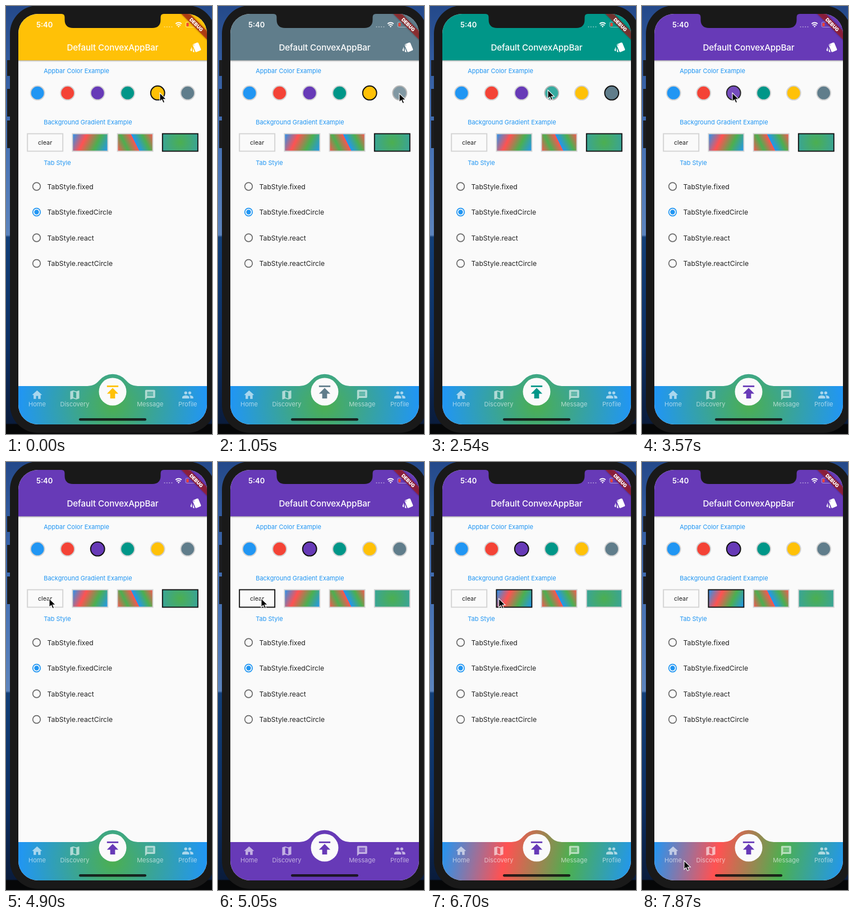
Recreate the animation shown at these times as an HTML page. Size 367 by 759 pixels, loop 8000 ms.

```html
<!DOCTYPE html>
<html lang="en">
<head>
<meta charset="utf-8">
<title>App bar demo</title>
<style>
html, body { margin: 0; width: 100%; height: 100%; overflow: hidden; background: #0a1c3c; }
svg { display: block; width: 367px; height: 759px; font-family: Inter, Roboto, sans-serif; }
.head { font-size: 11px; fill: #2196f3; }
.item { font-size: 12.2px; fill: #222; }
.tab { font-size: 11px; text-anchor: middle; fill: #fff; fill-opacity: .6; }
.radio { fill: none; stroke: #6b6b6b; stroke-width: 1.7; }
</style>
</head>
<body>
<svg viewBox="0 0 367 759">
  <defs>
    <linearGradient id="wall" x2="0" y2="1">
      <stop offset="0" stop-color="#24498a"/><stop offset=".25" stop-color="#3f6bb0"/>
      <stop offset=".535" stop-color="#5c84bd"/><stop offset=".54" stop-color="#123f78"/>
      <stop offset=".8" stop-color="#0c2f63"/><stop offset=".975" stop-color="#0a1c3c"/>
      <stop offset=".978" stop-color="#060708"/>
    </linearGradient>
    <clipPath id="screen"><rect x="22" y="14" width="336" height="728" rx="35"/></clipPath>
    <filter id="soft" x="-20%" y="-50%" width="140%" height="200%"><feGaussianBlur stdDeviation="1.5"/></filter>
  </defs>

  <rect width="367" height="759" fill="url(#wall)"/>
  <path d="M2 96h6v28h-6zM2 147h6v49h-6zM2 203h6v49h-6z" fill="#1c1d20"/>
  <rect x="7" y="-1" width="366" height="758" rx="50" fill="#191919"/>

  <g clip-path="url(#screen)">
    <rect x="22" y="14" width="336" height="728" fill="#fafafa"/>
    <rect x="18" y="80" width="344" height="17" fill="#000" opacity=".45" filter="url(#soft)"/>
    <rect id="appbar" x="22" y="14" width="336" height="82.3"/>
    <g fill="#fff">
      <text x="54" y="37.7" font-size="13" font-weight="600">5:40</text>
      <text x="190" y="78.6" font-size="15.2" font-weight="500" letter-spacing="-.1" text-anchor="middle">Default ConvexAppBar</text>
      <g opacity=".45">
        <circle cx="282.5" cy="37" r="1.1"/><circle cx="286.8" cy="37" r="1.1"/>
        <circle cx="291.1" cy="37" r="1.1"/><circle cx="295.4" cy="37" r="1.1"/>
      </g>
      <path d="M302.2 31.6a7.6 7.6 0 0 1 10.6 0M304 34.4a5 5 0 0 1 7 0" fill="none" stroke="#fff" stroke-width="1.9"/>
      <path d="M305.7 36l1.8 2 1.8-2q-1.8-1.6-3.6 0z"/>
      <rect x="320" y="28.5" width="18" height="9" rx="2.4" fill="none" stroke="#fff" stroke-opacity=".45"/>
      <rect x="321.5" y="30" width="4" height="6" rx="1" fill="#f44336"/>
    </g>
    <g id="page"></g>
    <path id="bar" d="M22 674H141C153 674 159 672 166 664A31.2 31.2 0 0 1 214 664C221 672 227 674 239 674H358V742H22Z"/>
    <g id="tabs"></g>
    <circle cx="190" cy="684" r="24.5" fill="#fafafa"/>
    <g id="publish"></g>
    <rect x="130" y="731" width="120" height="4.4" rx="2.2" fill="#111" opacity=".87"/>
    <g transform="translate(358 14) rotate(45)">
      <rect x="-40" y="21.4" width="80" height="10.8" fill="#000" opacity=".4" filter="url(#soft)"/>
      <rect x="-40" y="21.4" width="80" height="10.8" fill="#b71c1c" fill-opacity=".63"/>
      <text y="30" font-size="8.6" font-weight="900" text-anchor="middle" fill="#fff">DEBUG</text>
    </g>
  </g>
  <path d="M99 13V14Q104.5 14 104.5 20V24Q104.5 39 119.5 39H260.5Q275.5 39 275.5 24V20Q275.5 14 281 14V13Z" fill="#191919"/>
  <path id="cursor" d="M0 0V15.5L3.6 12.2 6 17.8 8.7 16.7 6.3 11.2H11.2Z" stroke="#fff" stroke-width="1.1"/>
</svg>

<script>
const $ = id => document.getElementById(id);
const LOOP = 8000;
const BLUE = '#2196f3', RED = '#ff5252', GREEN = '#4caf50';
const colors = [BLUE, '#f44336', '#673ab7', '#009688', '#ffc107', '#607d8b'];

const icons = {
  style: 'M2.53 19.65l1.34.56v-9.03l-2.43 5.86c-.41 1.02.08 2.19 1.09 2.61zm19.5-3.7L17.07 3.98c-.31-.75-1.04-1.21-1.81-1.23-.26 0-.53.04-.79.15L7.1 5.95c-.75.31-1.21 1.03-1.23 1.8-.01.27.04.54.15.8l4.96 11.97c.31.76 1.05 1.22 1.83 1.23.26 0 .52-.05.77-.15l7.36-3.05c1.02-.42 1.51-1.59 1.09-2.6zM7.88 8.75c-.55 0-1-.45-1-1s.45-1 1-1 1 .45 1 1-.45 1-1 1zm-2 11c0 1.1.9 2 2 2h1.45l-3.45-8.34v6.34z',
  Home: 'M10 20v-6h4v6h5v-8h3L12 3 2 12h3v8z',
  Discovery: 'M20.5 3l-.16.03L15 5.1 9 3 3.36 4.9c-.21.07-.36.25-.36.48V20.5c0 .28.22.5.5.5l.16-.03L9 18.9l6 2.1 5.64-1.9c.21-.07.36-.25.36-.48V3.5c0-.28-.22-.5-.5-.5zM15 19l-6-2.11V5l6 2.11V19z',
  Message: 'M20 2H4c-1.1 0-2 .9-2 2v18l4-4h14c1.1 0 2-.9 2-2V4c0-1.1-.9-2-2-2zm-2 12H6v-2h12v2zm0-3H6V9h12v2zm0-3H6V6h12v2z',
  Profile: 'M16 11a3 3 0 1 0 0-6 3 3 0 0 0 0 6zM8 11a3 3 0 1 0 0-6 3 3 0 0 0 0 6zm0 2c-2.33 0-7 1.17-7 3.5V19h14v-2.5c0-2.33-4.67-3.5-7-3.5zm8 0c-.29 0-.62.02-.97.05 1.16.84 1.97 1.97 1.97 3.45V19h6v-2.5c0-2.33-4.67-3.5-7-3.5z',
  publish: 'M5 4v2h14V4H5zm0 10h4v6h6v-6h4l-7-7-7 7z'
};
const icon = (name, x, y, scale, attrs = '') =>
  `<path d="${icons[name]}" transform="translate(${x} ${y}) scale(${scale}) translate(-12 -12)" ${attrs}/>`;

// Gradients sized to a box: 1 diagonal, 2 split, 3 radial
function gradient(id, kind, x, y, w, h) {
  const stops = list => list.map(([o, c]) => `<stop offset="${o}" stop-color="${c}"/>`).join('');
  const common = `id="${id}" gradientUnits="userSpaceOnUse"`;
  if (kind === 3) {
    return `<radialGradient ${common} cx="${x + w / 2}" cy="${y + h / 2}" r="${h * 2.45}">` +
      stops([[0, GREEN], [1, BLUE]]) + '</radialGradient>';
  }
  const [y1, y2] = kind === 1 ? [y, y + h] : [y + h, y];
  return `<linearGradient ${common} x1="${x}" y1="${y1}" x2="${x + w}" y2="${y2}">` +
    stops(kind === 1
      ? [[0, BLUE], [1 / 3, RED], [2 / 3, GREEN], [1, BLUE]]
      : [[0, RED], [.25, GREEN], [.5, RED], [.5, BLUE], [.75, GREEN], [1, RED]]) + '</linearGradient>';
}

function buildPage() {
  const head = (y, s) => `<text class="head" x="67.2" y="${y}">${s}</text>`;
  let out = icon('style', 338.3, 73, .896, 'fill="#fff"') +
    head(119, 'Appbar Color Example') + head(210, 'Background Gradient Example') + head(281.6, 'Tab Style');
  colors.forEach((c, i) => {
    out += `<circle class="dot" cx="${56.2 + i * 53.5}" cy="154.2" r="12.4" fill="${c}" stroke-width="2"/>`;
  });
  for (let i = 0; i < 4; i++) {
    const x = 38.2 + i * 80.2;
    if (i) out += gradient('g' + i, i, x, 226.5, 63, 31);
    out += `<rect class="swatch" x="${x}" y="226.5" width="63" height="31" fill="${i ? `url(#g${i})` : '#fafafa'}" stroke-width="1.9"/>`;
  }
  out += '<text x="69.6" y="245.7" font-size="10.8" text-anchor="middle" fill="#222">clear</text>';
  ['fixed', 'fixedCircle', 'react', 'reactCircle'].forEach((s, i) => {
    const y = 320 + i * 45.5, on = i === 1;
    out += `<circle class="radio" cx="54.5" cy="${y}" r="6.8" ${on ? `style="stroke:${BLUE}"` : ''}/>` +
      (on ? `<circle cx="54.5" cy="${y}" r="4.2" fill="${BLUE}"/>` : '') +
      `<text class="item" x="73.6" y="${y + 4.5}">TabStyle.${s}</text>`;
  });
  $('page').innerHTML = out;
}

function buildTabs() {
  const tabs = { Home: 55.4, Discovery: 122.5, Message: 256.8, Profile: 323.8 };
  $('tabs').innerHTML = gradient('bar1', 1, 22, 674, 336, 68) + gradient('bar3', 3, 22, 674, 336, 68) +
    Object.entries(tabs).map(([name, x]) =>
      icon(name, x, 689.7, .896, 'fill="#fff" fill-opacity=".6"') +
      `<text class="tab" x="${x}" y="710">${name}</text>`).join('');
  $('publish').innerHTML = icon('publish', 190, 684.5, 1.45);
}

buildPage();
buildTabs();
const dots = document.querySelectorAll('.dot');
const swatches = document.querySelectorAll('.swatch');

// Pointer strokes: first step, last step, number of steps, curve control, end point
const strokes = [
  [150, 750, 5, 300, 181, 323, 155],
  [1350, 2090, 6, 266, 172, 210, 149],
  [2690, 3120, 4, 186, 162, 161, 154],
  [3720, 4450, 6, 136, 204, 77, 242],
  [5500, 5800, 3, 106, 244, 136, 243],
  [6700, 6990, 3, 110, 241, 86, 243],
  [7580, 7870, 3, 86, 480, 75, 707]
];

function pointer(t) {
  let x = 274, y = 154;
  for (const [t0, t1, n, cx, cy, ex, ey] of strokes) {
    if (t < t0) break;
    const step = Math.min(n, Math.floor((t - t0) / (t1 - t0) * (n - 1) + 1e-6) + 1);
    const p = step / n, k = p * p * (3 - 2 * p), q = 1 - k;
    x = q * q * x + 2 * q * k * cx + k * k * ex;
    y = q * q * y + 2 * q * k * cy + k * k * ey;
  }
  return [x, y];
}

// Latest value whose start time has passed
const at = (t, ...keys) => keys.reduce((v, [start, value]) => t >= start ? value : v, null);

function draw(t) {
  const color = at(t, [0, 4], [1050, 5], [2540, 3], [3570, 2]);
  const ring = at(t, [0, 4], [1200, 5], [2690, 3], [3570, 2]);
  const pressed = at(t, [0, -1], [1050, 5], [1200, -1], [2540, 3], [2690, -1], [3570, 2], [3720, -1]);
  const fill = at(t, [0, 3], [5050, 0], [6250, 1]);

  $('appbar').setAttribute('fill', colors[color]);
  $('publish').setAttribute('fill', colors[color]);
  $('bar').setAttribute('fill', fill ? `url(#bar${fill})` : colors[color]);
  dots.forEach((dot, i) => {
    dot.setAttribute('stroke', i === ring ? '#111' : i === pressed ? '#a5a5a5' : '#d3d3d3');
    dot.setAttribute('opacity', i === pressed ? (i === ring ? .9 : .78) : 1);
  });
  swatches.forEach((s, i) => s.setAttribute('stroke', i === fill ? '#111' : '#d3d3d3'));
  $('cursor').setAttribute('transform', `translate(${pointer(t).join(' ')})`);
}

const start = performance.now();
function frame() {
  draw((performance.now() - start) % LOOP);
  requestAnimationFrame(frame);
}
draw(0);
requestAnimationFrame(frame);
</script>
</body>
</html>
```
